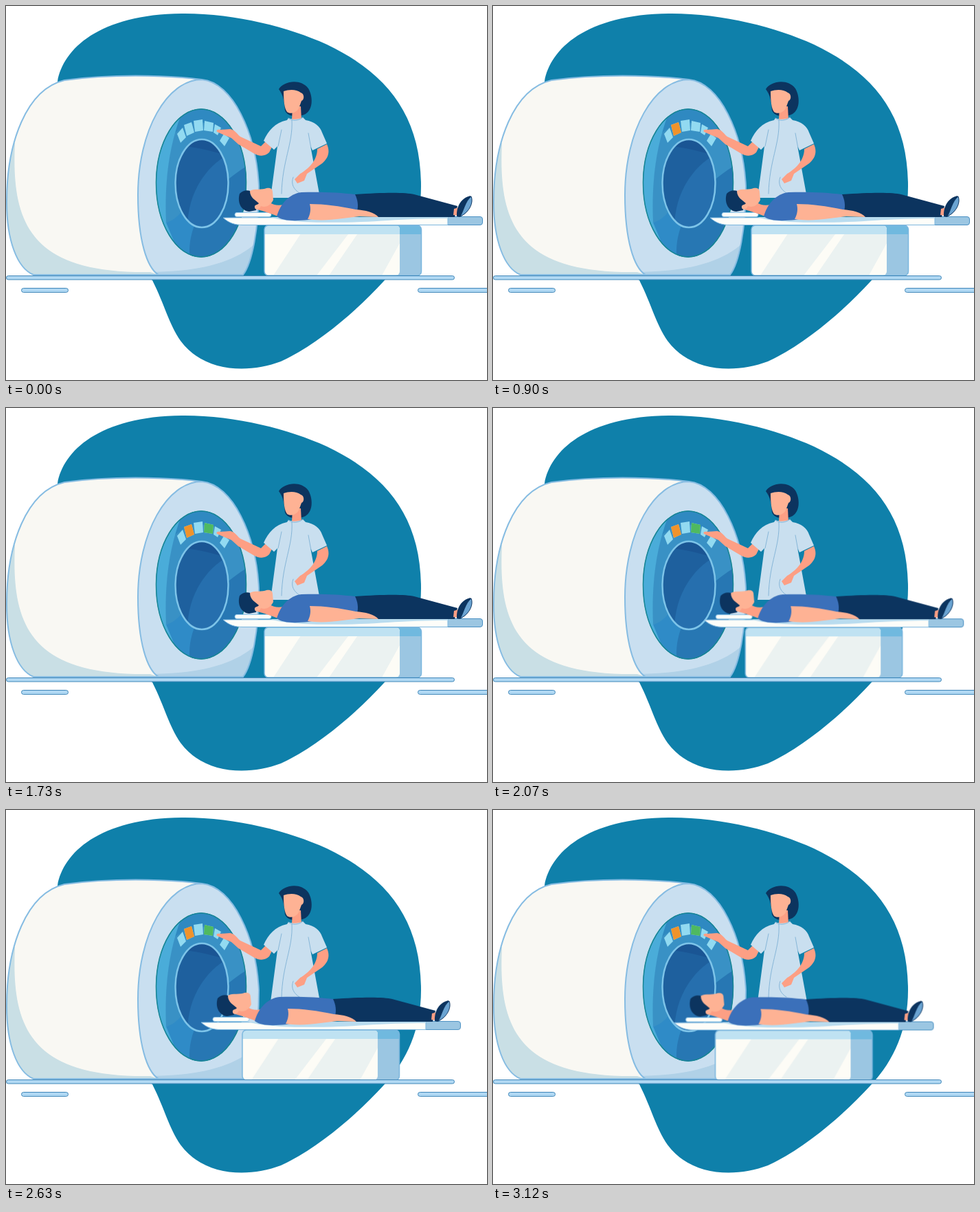
An HTML page that plays this animation: 700 px wide and 544 px high, repeating every 3.19 s.

```html
<!DOCTYPE html>
<html lang="en">
<head>
<meta charset="utf-8">
<title>Scanner room</title>
<style>
  html, body { margin: 0; width: 100%; height: 100%; overflow: hidden; background: #fff; }
  svg { display: block; width: 700px; height: 544px; }
  .navy { fill: #0c345f; }
  .skin { fill: #feb294; }
  .skin-dark { fill: #fd9f84; }
  .coat { fill: #c9dfef; }
  .edge { stroke: #86bce2; stroke-width: 2; }
  .line { fill: none; stroke: #86b6d8; stroke-width: 1; stroke-linecap: round; }
  .floor { fill: #b0d8f3; stroke: #3f86b8; stroke-width: 1; }
</style>
</head>
<body>
<svg viewBox="0 0 700 544">
  <defs>
    <path id="body" d="M285 107C230 100 150 99 85 108C30 121 1 198 1 285C1 341 16 381 40 391H222"/>
    <path id="face" d="M285 107C235 107 192 180 192 275C192 340 205 381 222 391H345C358 374 368 325 368 262C364 185 330 111 285 107Z"/>
    <clipPath id="in-body"><use href="#body"/></clipPath>
    <clipPath id="in-face"><use href="#face"/></clipPath>
    <clipPath id="ring"><ellipse cx="284" cy="257.5" rx="66" ry="108"/></clipPath>
    <clipPath id="bore"><ellipse cx="285" cy="258" rx="38.5" ry="64"/></clipPath>
    <clipPath id="front"><rect x="376" y="319" width="197" height="73" rx="6"/></clipPath>
    <clipPath id="base"><rect x="376" y="319" width="228.500" height="73" rx="6"/></clipPath>
  </defs>

  <path fill="#0f80aa" d="M75 110C83 62 137 11 260 11C335 11 412 31 467 56C555 98 604 160 604 262C604 318 584 364 550 400C508 446 452 493 400 517C352 535 288 533 254 487C237 462 231 435 213 399L90 300Z"/>

  <!-- scanner housing -->
  <use href="#body" fill="#f9f8f3"/>
  <path clip-path="url(#in-body)" fill="#c9dfe5" d="M13 199C8 310 30 390 210 387L222 391H0V199Z"/>
  <use href="#body" class="edge" fill="none"/>
  <use href="#face" fill="#c9dff0"/>
  <path clip-path="url(#in-face)" fill="#b0d1e7" d="M207 387C280 387 339 373 370 338V391H222Z"/>
  <use href="#face" class="edge" fill="none"/>

  <!-- ring and bore -->
  <g clip-path="url(#ring)">
    <path fill="#3991c5" d="M210 140H360V370H210Z"/>
    <path fill="#2f89c1" d="M255 140H335V196C312 168 281 160 246 184Z"/>
    <path fill="#4aacd9" d="M210 140H262C240 190 230 245 233 315C245 313 255 307 262 298L272 370H210Z"/>
    <path fill="#2f8bc7" d="M233 315C250 311 265 291 274 260L278 370H256Z"/>
    <path fill="#2777b3" d="M268 370C260 318 300 262 352 232V370Z"/>
  </g>
  <ellipse cx="284" cy="257.500" rx="65.500" ry="107.500" fill="none" stroke="#178594" stroke-width="1.500"/>
  <g clip-path="url(#bore)">
    <path fill="#1e609e" d="M240 190H330V330H240Z"/>
    <path fill="#1a5594" d="M260 190H330V218C306 214 284 206 260 204Z"/>
    <path fill="#266fae" d="M264 330C262 280 285 235 330 212V330Z"/>
  </g>
  <ellipse cx="285" cy="258" rx="38.500" ry="64" fill="none" stroke="#7dc4e9" stroke-width="2.500"/>
  <g id="keys" fill="#92daf1"></g>

  <!-- radiographer -->
  <path class="navy" d="M397 121C404 109 429 105 440 120C447 132 447 150 436 157C426 162 410 162 406 152C405 140 404 130 397 121Z"/>
  <path class="skin-dark" d="M417 146H429L430 166H416Z"/>
  <path class="skin" d="M404 124C412 121 423 121 429 126C435 128 434 137 430 138L426 149C421 157 412 157 409 154C405 149 404 137 404 124Z"/>
  <path class="skin-dark" d="M389 201L383 213C377 219 368 219 360 214L338 201L328 192L316 187L307 183C305 180 309 179 313 180L326 179C333 180 335 185 341 190L371 204L379 196Z"/>
  <path class="coat" d="M411 163C418 166 426 165 432 162L436 166C449 168 457 175 460 184L467 200L446 210L443 203L457 279H385L395 204L390 209L375 196C382 181 391 170 409 166Z"/>
  <path class="line" d="M416 166C418 200 402 225 401 273M401 180L396 204M440 185L444 207M411 163C416 168 426 167 432 162"/>
  <path class="line" d="M418 249C414 259 419 267 427 272"/>
  <path class="skin-dark" d="M453 208L467 201C472 212 469 221 460 229L438 244L434 254L424 258L420 252L428 244C440 237 453 225 453 208Z"/>

  <!-- table and patient -->
  <g id="table">
    <g clip-path="url(#base)">
      <path fill="#9bc6e2" d="M376 318H605V392H376Z"/>
      <path fill="#70b9df" d="M560 318H605V332H560Z"/>
    </g>
    <g clip-path="url(#front)">
      <path fill="#fdfcf6" d="M376 318H573V392H376Z"/>
      <path fill="#ebf2f1" d="M437 319H508L452 392H389ZM520 319H573V345L547 392H470Z"/>
      <path fill="#bfe2f2" d="M376 318H573V332H376Z"/>
    </g>
    <rect x="376" y="319" width="228.500" height="73" rx="6" fill="none" stroke="#7bb6de" stroke-width="1.500"/>
    <path fill="#9bc6e2" stroke="#4a90c3" d="M640 306.500H690Q693.500 306.500 693.500 310V315Q693.500 318.500 690 318.500H640Z"/>
    <path fill="#fdfdf9" stroke="#7bb6de" d="M316 308C325 316 333 318.500 345 318.500H643V307Z"/>
    <path fill="#b9dcef" d="M385 307H643V309C610 309 585 310 555 312C500 316 410 317 385 307Z"/>
    <rect x="333" y="300.500" width="53" height="6" rx="3" fill="#fdfdf9" stroke="#90c5e7"/>
    <path class="skin-dark" d="M366 287L384 286C389 289 395 291 404 289L396 306C386 302 377 299 366 296Z"/>
    <path class="navy" d="M340 273C345 267 354 267 360 271L369 284L364 297L354 299C343 298 336 287 340 273Z"/>
    <path class="skin" d="M355 269C361 265 374 268 379 265C386 264 388 267 388 271L389 282C385 290 378 294 371 291C368 298 361 297 362 291C364 288 368 289 368 287C363 282 355 279 355 269Z"/>
    <path class="navy" d="M508 274C550 271 582 271 594 274L657 291L653 307H540C525 304 516 301 508 295Z"/>
    <path fill="#3b70ba" d="M394 306C399 288 412 273 430 271C455 270 485 271 508 274C512 282 513 291 511 298L440 311C420 313 403 313 394 306Z"/>
    <path class="skin" d="M442 288C464 288 485 291 509 296C523 297 536 300 542 307L514 306L490 309C469 312 452 312 439 310C443 303 444 295 442 288Z"/>
    <path class="skin-dark" d="M652 295L659 293L660 305L651 304Z"/>
    <path class="navy" d="M656 306C655 291 663 279 676 276C681 285 673 301 660 307Z"/>
    <path fill="#6ba4d2" stroke="#0c345f" d="M661 306C666 298 668 284 677 277C681 287 673 301 661 306Z"/>
  </g>

  <rect class="floor" x=".5" y="392.500" width="652" height="5.500" rx="2.750"/>
  <rect class="floor" x="22.500" y="410.500" width="68" height="6" rx="3"/>
  <rect class="floor" x="599.500" y="410.500" width="110" height="6" rx="3"/>
</svg>
<script>
const LOOP = 3190, TICK = 70;
const keys = document.getElementById('keys');

function addKey(points, fill) {
  const key = document.createElementNS('http://www.w3.org/2000/svg', 'polygon');
  key.setAttribute('points', points);
  if (fill) key.setAttribute('fill', fill);
  return keys.appendChild(key);
}

const amberShape = '259,173 270,169 274,184 263,189';
const greenShape = '289,167 302,170 301,183 288,181';
['249,186 257,177 262,191 254,199', amberShape,
 '273,167 286,165 287,181 275,183', greenShape,
 '304,172 313,177 308,188 302,184',
 '317,186 325,192 318,204 311,196'].forEach(points => addKey(points));
const amber = addKey(amberShape, '#f0932b');
const green = addKey(greenShape, '#4fb960');

// Moves from one state to another in equal ticks, the first landing at `start`.
function stepped(element, start, count, from, to) {
  const end = start + count * TICK;
  element.animate([
    { offset: 0, ...from },
    { offset: start / LOOP, ...from, easing: `steps(${count}, start)` },
    { offset: end / LOOP, ...to },
    { offset: 1, ...to }
  ], { duration: LOOP, iterations: Infinity }).startTime = 0;
}

stepped(amber, 270, 10, { opacity: 0 }, { opacity: 1 });
stepped(green, 1100, 10, { opacity: 0 }, { opacity: 1 });
stepped(document.getElementById('table'), 1930, 18,
  { transform: 'translate(0px, 0px)' }, { transform: 'translate(-52.5px, 1.5px)' });
</script>
</body>
</html>
```
